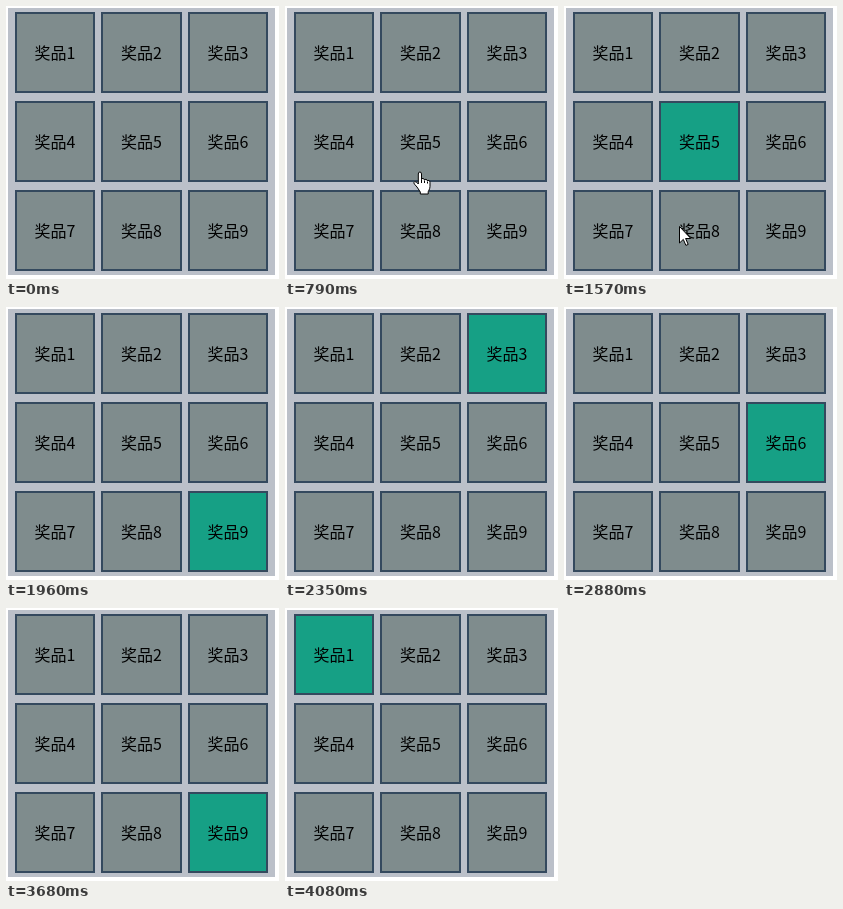
These frames come from a looping animation (273 px wide and 273 px high, 5620 ms). An HTML page:

```html
<!DOCTYPE html>
<html lang="zh-CN">
<head>
<meta charset="utf-8">
<title>九宫格抽奖</title>
<style>
  html, body { margin: 0; width: 100%; height: 100%; overflow: hidden; background: #fff; }
  svg { display: block; width: 100%; height: 100%; }
  .cell { fill: #7f8c8d; stroke: #34495e; stroke-width: 2; }
  .cell.on { fill: #16a085; }
  text { font: 16px "Noto Sans CJK SC", "Noto Sans CJK", "Noto Sans", sans-serif; text-anchor: middle; fill: #000; }
  .cursor { fill: #fff; stroke: #000; stroke-width: 1; stroke-linejoin: round; visibility: hidden; }
</style>
</head>
<body>
<svg viewBox="0 0 273 273">
  <rect x="2" y="2" width="267" height="267" fill="#bbc0c9"/>
  <g id="grid"></g>
  <path id="arrow" class="cursor" d="M.5 .5V17l3.8-3.6 2.6 6 2.3-1-2.6-5.9h5.2z"/>
  <g id="hand" class="cursor">
    <path d="M5.3 13V3q0-2 1.6-2t1.6 2v5.5q.2-1.3 1.6-1t1.4 1.6q.3-1 1.6-.7t1.4 1.6q.3-.9 1.4-.5t1.1 1.8v4q0 2-1 3.8l-.8 1.6v2.3H7.3v-2L4 16Q.7 12.6.7 11.6q1-1.8 2.8-.4z"/>
    <path d="M8.5 8.5v3.5M11.5 9.5V12M14.5 10.5V12.5" fill="none"/>
  </g>
</svg>
<script>
  const LOOP = 5620;
  const columns = [[9, 89], [95, 176], [182, 262]];
  const rows = [[6, 87], [95, 176], [184, 265]];

  // [start ms, lit prize, cursor, x, y]
  const steps = [
    [0, 0],
    [400, 0, 'arrow', 172, 255],
    [530, 0, 'arrow', 160, 226],
    [660, 0, 'arrow', 147, 193],
    [790, 0, 'hand', 128, 165],
    [920, 0, 'hand', 128, 154],
    [1050, 0, 'hand', 128, 156],
    [1180, 1, 'hand', 126, 161],
    [1310, 2, 'arrow', 122, 184],
    [1440, 4, 'arrow', 118, 203],
    [1570, 5, 'arrow', 115, 220],
    [1700, 7, 'arrow', 112, 240],
    [1830, 8], [1960, 9], [2090, 1], [2220, 2], [2350, 3], [2480, 4],
    [2610, 5], [2880, 6], [3040, 7], [3280, 8], [3680, 9], [4080, 1]
  ];

  const grid = document.getElementById('grid');
  const cursors = ['arrow', 'hand'].map(id => document.getElementById(id));

  function add(tag, attributes) {
    const node = document.createElementNS('http://www.w3.org/2000/svg', tag);
    for (const key in attributes) node.setAttribute(key, attributes[key]);
    return grid.appendChild(node);
  }

  const cells = [];
  for (const [top, bottom] of rows) {
    for (const [left, right] of columns) {
      cells.push(add('rect', {
        class: 'cell', x: left + 1, y: top + 1,
        width: right - left - 2, height: bottom - top - 2
      }));
      add('text', { x: (left + right) / 2, y: top + 47 }).textContent = '奖品' + cells.length;
    }
  }

  function draw(now) {
    const time = now % LOOP;
    const [, prize, shape, x, y] = steps.filter(step => step[0] <= time).pop();
    cells.forEach((cell, i) => cell.classList.toggle('on', i + 1 === prize));
    for (const cursor of cursors) {
      const shown = cursor.id === shape;
      cursor.style.visibility = shown ? 'visible' : 'hidden';
      if (shown) cursor.setAttribute('transform', `translate(${x} ${y})`);
    }
  }

  let start;
  function tick(now) {
    start ??= now;
    draw(now - start);
    requestAnimationFrame(tick);
  }
  draw(0);
  requestAnimationFrame(tick);
</script>
</body>
</html>
```
